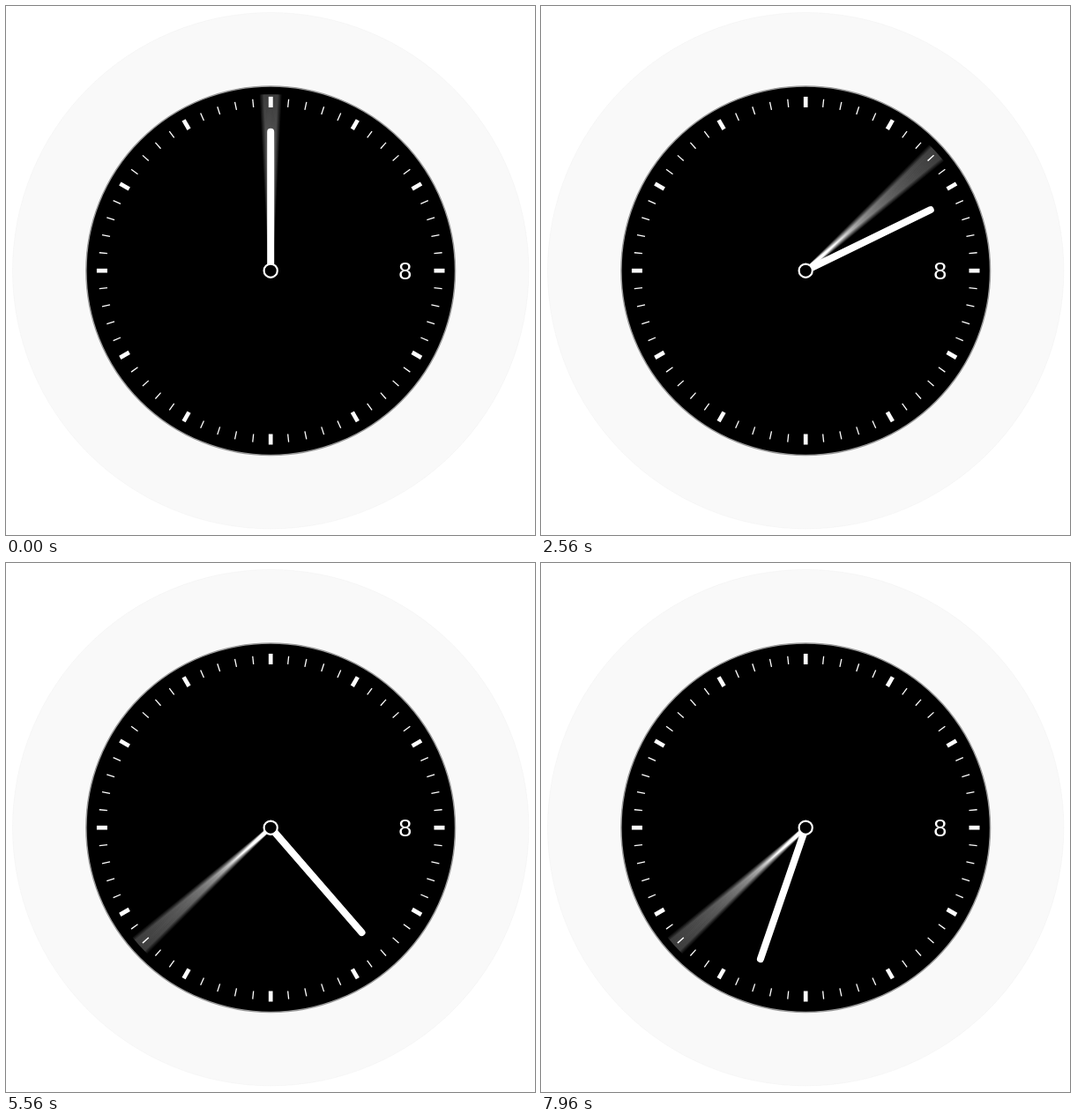
Animation, 600 px wide and 600 px high, one loop 8 s. Source, as an HTML page with a canvas:

```html
<!DOCTYPE html>
<html lang="en">
<head>
<meta charset="utf-8">
<title>Clock</title>
<style>
  html, body { margin: 0; width: 100%; height: 100%; overflow: hidden; background: #fff; }
  canvas { display: block; }
</style>
</head>
<body>
<canvas id="stage" width="600" height="600"></canvas>
<script>
const ctx = document.getElementById('stage').getContext('2d');
const STEP_MS = 40, STEPS = 200;
const BLUR_SAMPLES = 16, BLUR_DEGREES = 6;

function disc(radius, fill, stroke, lineWidth) {
  ctx.beginPath();
  ctx.arc(0, 0, radius, 0, 2 * Math.PI);
  ctx.fillStyle = fill;
  ctx.fill();
  ctx.strokeStyle = stroke;
  ctx.lineWidth = lineWidth;
  ctx.stroke();
}

// Radial line; 0 degrees points up, angles run clockwise.
function spoke(degrees, inner, outer, width, color = '#fff', cap = 'butt') {
  const a = degrees * Math.PI / 180, x = Math.sin(a), y = -Math.cos(a);
  ctx.beginPath();
  ctx.moveTo(x * inner, y * inner);
  ctx.lineTo(x * outer, y * outer);
  ctx.strokeStyle = color;
  ctx.lineWidth = width;
  ctx.lineCap = cap;
  ctx.stroke();
}

function drawDial() {
  disc(292.7, '#f9f9f9', '#f0f0f0', 0.5);
  disc(209.3, '#000', '#999', 1.5);
  for (let minute = 0; minute < 60; minute++) {
    if (minute % 5) spoke(minute * 6, 186.3, 195.5, 1.3);
    else spoke(minute * 6, 185.3, 197.3, 4.7);
  }
  ctx.fillStyle = '#fff';
  ctx.font = '27px "Liberation Sans", Arial, sans-serif';
  ctx.textAlign = 'center';
  ctx.fillText('8', 152.5, 9.7);
}

// Fast hand, smeared over half of its 12 degree step.
function drawBlurredHand(degrees) {
  ctx.globalCompositeOperation = 'lighter';
  for (let i = 0; i < BLUR_SAMPLES; i++) {
    const offset = ((i + 0.5) / BLUR_SAMPLES - 0.5) * BLUR_DEGREES;
    spoke(degrees + offset, 0, 200, 5, `rgba(255,255,255,${1 / BLUR_SAMPLES})`);
  }
  ctx.globalCompositeOperation = 'source-over';
}

function draw(step) {
  ctx.setTransform(1, 0, 0, 1, 0, 0);
  ctx.clearRect(0, 0, 600, 600);
  ctx.translate(300.2, 300.2);
  drawDial();
  drawBlurredHand(step * 12);
  spoke(step, 0, 157.5, 8, '#fff', 'round');
  disc(7.6, '#000', '#fff', 2.2);
}

function tick() {
  draw(Math.floor(performance.now() / STEP_MS + 0.01) % STEPS);
  requestAnimationFrame(tick);
}
tick();
</script>
</body>
</html>
```
